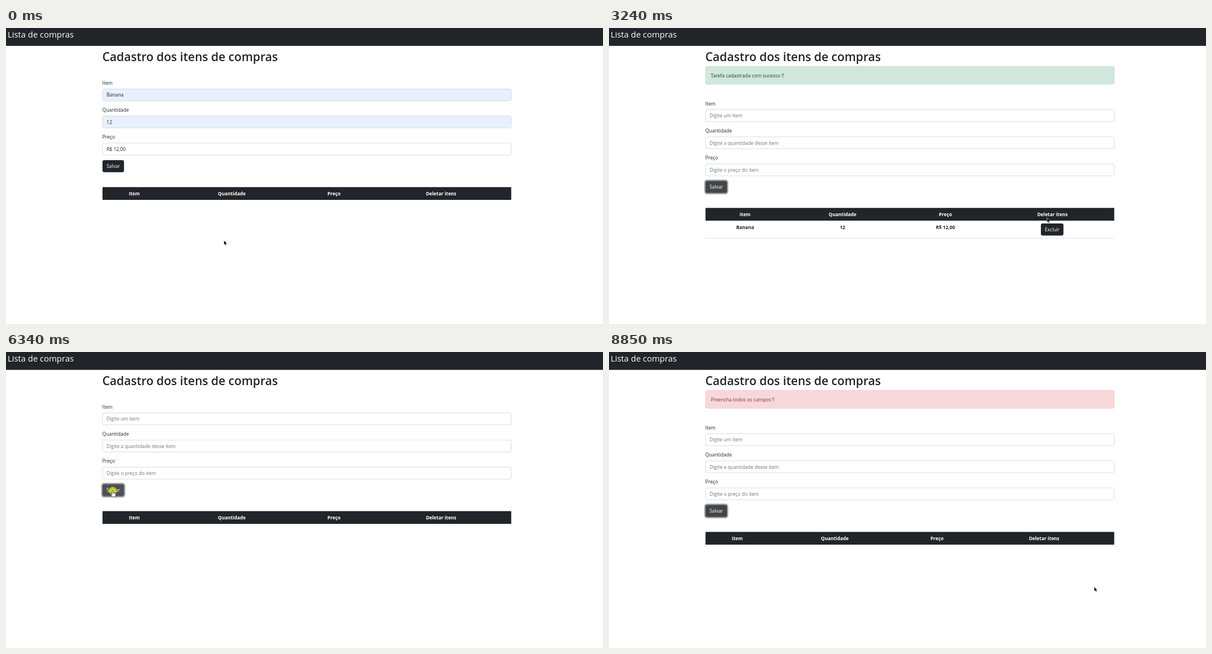
Write an HTML page that moves like this. It is 1063x527 px and loops after 8910 ms.

```html
<!DOCTYPE html>
<html lang="pt-BR">
<head>
<meta charset="utf-8">
<title>Lista de compras</title>
<style>
  html, body { margin: 0; width: 100%; height: 100%; overflow: hidden; background: #fff; }
  svg { display: block; width: 100%; height: 100%; }
  text { font: 8.55px "Open Sans", "Noto Sans", sans-serif; fill: #212529; }
  .brand { font-size: 14.9px; fill: #fff; }
  .title { font-size: 21.1px; font-weight: 600; }
  .bold { font-size: 8.4px; font-weight: 700; }
  .mid { text-anchor: middle; }
  .light { fill: #fff; }
  .hint { fill: #6c757d; }
</style>
</head>
<body>
<svg id="stage" viewBox="0 0 1063 527" preserveAspectRatio="none"></svg>
<script>
const LOOP = 8910, STEP = 70, SHIFT = 37;
const SAVED = 1880, DELETED = 4080, CLEARED = 4890, REFUSED = 6480;
const PRESSES = [[1750, SAVED], [3870, DELETED], [6340, REFUSED]];
const DARK = '#212529';

// start time, number of steps, waypoints as [progress, x, y]
const MOVES = [
  [370, 13, [[0, 388, 378], [.15, 374, 367], [.5, 276, 299], [.8, 202, 252], [1, 184.5, 242.5]]],
  [2670, 13, [[0, 184.5, 242.5], [.15, 240, 252], [.45, 600, 312], [.69, 780, 338], [1, 782, 357]]],
  [3590, 4, [[0, 782, 357], [1, 779, 354]]],
  [4540, 13, [[0, 779, 354], [.15, 735, 351], [.54, 472, 326], [.85, 258, 275], [1, 216, 259]]],
  [5460, 6, [[0, 216, 259], [.5, 197, 251], [1, 190, 247]]],
  [7010, 12, [[0, 190, 247], [.15, 235, 262], [.5, 540, 345], [.8, 810, 404], [1, 865, 415.5]]],
  [8710, 3, [[0, 865, 415.5], [1, 864, 418]]]
];

const FIELDS = [
  ['Item', 'Banana', 'Digite um item', true],
  ['Quantidade', '12', 'Digite a quantidade desse item', true],
  ['Preço', 'R$ 12,00', 'Digite o preço do item', false]
];
const fieldTop = i => 108.5 + i * 48.25;

const stage = document.getElementById('stage');

function add(parent, tag, attrs, content = '') {
  const el = document.createElementNS('http://www.w3.org/2000/svg', tag);
  for (const key in attrs) el.setAttribute(key, attrs[key]);
  el.textContent = content;
  parent.append(el);
  return el;
}
const group = parent => add(parent, 'g', {});
const box = (parent, x, y, width, height, fill, more = {}) =>
  add(parent, 'rect', { x, y, width, height, fill, ...more });
const label = (parent, x, y, content, cls = '') =>
  add(parent, 'text', { x, y, class: cls }, content);
const show = (el, on) => el.setAttribute('visibility', on ? 'visible' : 'hidden');

function makeButton(parent, x, y, width, caption) {
  const g = group(parent);
  const ring = box(g, x - 1.1, y - 1.1, width + 2.2, 23.7, 'none',
    { rx: 4, stroke: '#a0a2a4', 'stroke-width': 2.3 });
  const face = box(g, x, y, width, 21.5, DARK, { rx: 3.2 });
  label(g, x + width / 2, y + 13.9, caption, 'mid light');
  return { g, ring, face, x, y, width };
}

function paintButton(button, hovered, focused, pressed) {
  show(button.ring, focused);
  button.face.setAttribute('fill', pressed ? '#4d5154' : hovered || focused ? '#424649' : DARK);
}

// Page
box(stage, 0, 0, 1063, 31.8, DARK);
label(stage, 3, 17.2, 'Lista de compras', 'brand');
label(stage, 171.5, 58.5, 'Cadastro dos itens de compras', 'title');

function makeAlert(fill, stroke, color, message) {
  const g = group(stage);
  box(g, 172, 68.3, 727.5, 32, fill, { stroke, 'stroke-width': .7, rx: 3.2 });
  label(g, 181.2, 87.7, message).style.fill = color;
  return g;
}
const success = makeAlert('#d1e7dd', '#badbcc', '#26402f', 'Tarefa cadastrada com sucesso !!');
const danger = makeAlert('#f8d7da', '#f5c2c7', '#75393f', 'Preencha todos os campos !!');

const page = group(stage);
const inputs = FIELDS.map(([name, value, hint, auto], i) => {
  const y = fieldTop(i);
  label(page, 171.6, y - 7.8, name);
  const frame = box(page, 172, y, 727.5, 21.2, '#fff', { rx: 3.2, stroke: '#ced4da', 'stroke-width': .8 });
  return {
    frame, auto,
    value: label(page, 179, y + 13.9, value),
    hint: label(page, 179, y + 13.9, hint, 'hint')
  };
});
const save = makeButton(page, 171.8, 235.2, 38.3, 'Salvar');

box(page, 171.8, 283.3, 727.8, 22.7, DARK);
function makeColumns(parent, centers, names, y, cls) {
  names.forEach((name, i) => label(parent, centers[i], y, name, 'bold mid ' + cls));
}
const HEADS = ['Item', 'Quantidade', 'Preço', 'Deletar itens'];
const WIDE = [228.5, 402, 584, 774.7], FILLED = [242.3, 415.8, 599, 789.5];
const emptyHead = group(page), filledHead = group(page), row = group(page);
makeColumns(emptyHead, WIDE, HEADS, 298.2, 'light');
makeColumns(filledHead, FILLED, HEADS, 298.2, 'light');
makeColumns(row, FILLED, ['Banana', '12', 'R$ 12,00'], 321.2, '');
box(row, 171.8, 336.8, 727.8, .7, '#d5d8db');
const remove = makeButton(row, 769, 311, 40.2, 'Excluir');

// Pointer
const halo = add(stage, 'circle', { r: 7, fill: '#ff0', opacity: .58 });
const pointer = group(stage);
const cursors = {
  arrow: add(pointer, 'path', {
    d: 'M0 0V8.3L1.9 6.6L3.2 9.5L4.6 8.9L3.3 6.1H5.8Z',
    fill: '#000', stroke: '#fff', 'stroke-width': .6
  }),
  beam: add(pointer, 'path', {
    d: 'M-1.8-4.3H-.5L0-3.9L.5-4.3H1.8M0-3.9V3.9M-1.8 4.3H-.5L0 3.9L.5 4.3H1.8',
    fill: 'none', stroke: '#333', 'stroke-width': .8
  }),
  hand: add(pointer, 'path', {
    d: 'M-1 0Q0-1.2 1 0V4L4.6 5Q5.6 5.3 5.4 6.6L4.6 11H-.5L-3.2 7Q-3.4 5.6-2 5.8L-1 6.8Z',
    fill: '#fff', stroke: '#222', 'stroke-width': .6
  })
};

function along(points, u) {
  const i = Math.max(1, points.findIndex(p => p[0] >= u));
  const [u0, x0, y0] = points[i - 1], [u1, x1, y1] = points[i];
  const k = (u - u0) / (u1 - u0);
  return [x0 + (x1 - x0) * k, y0 + (y1 - y0) * k];
}

function pointerAt(t) {
  const move = MOVES.filter(m => t >= m[0]).pop();
  if (!move) return MOVES[0][2][0].slice(1);
  const [start, steps, points] = move;
  return along(points, Math.min(1, (Math.floor((t - start) / STEP) + 1) / steps));
}

function draw(t) {
  const saved = t >= SAVED;
  const good = saved && t < CLEARED, bad = t >= REFUSED;
  const listed = saved && t < DELETED;
  const shift = good || bad ? SHIFT : 0;
  const press = PRESSES.findIndex(([from, to]) => t >= from && t < to);
  const [x, y] = pointerAt(t);
  const inside = (left, top, width, height) =>
    x >= left && x <= left + width && y - shift >= top && y - shift <= top + height;
  const over = b => inside(b.x, b.y, b.width, 21.5);

  page.setAttribute('transform', `translate(0 ${shift})`);
  show(success, good);
  show(danger, bad);
  inputs.forEach(input => {
    show(input.value, !saved);
    show(input.hint, saved);
    input.frame.setAttribute('fill', !saved && input.auto ? '#e8f0fe' : '#fff');
  });

  // Hidden groups need display, since their rings set their own visibility.
  row.style.display = listed ? '' : 'none';
  show(filledHead, listed);
  show(emptyHead, !listed);

  const onSave = over(save), onRemove = listed && over(remove);
  const saveFocus = (t >= PRESSES[0][0] && t < PRESSES[1][0]) || t >= PRESSES[2][0];
  paintButton(save, onSave, saveFocus, press === 0 || press === 2);
  paintButton(remove, onRemove, press === 1, press === 1);

  const onField = FIELDS.some((_, i) => inside(172, fieldTop(i) - .5, 727.5, 22));
  const kind = onSave || onRemove ? 'hand' : onField ? 'beam' : 'arrow';
  for (const name in cursors) show(cursors[name], name === kind);
  pointer.setAttribute('transform', `translate(${x} ${y})`);
  halo.setAttribute('cx', x);
  halo.setAttribute('cy', y);
  show(halo, press >= 0);
}

const begin = performance.now();
function tick() {
  draw((performance.now() - begin) % LOOP);
  requestAnimationFrame(tick);
}
tick();
</script>
</body>
</html>
```
